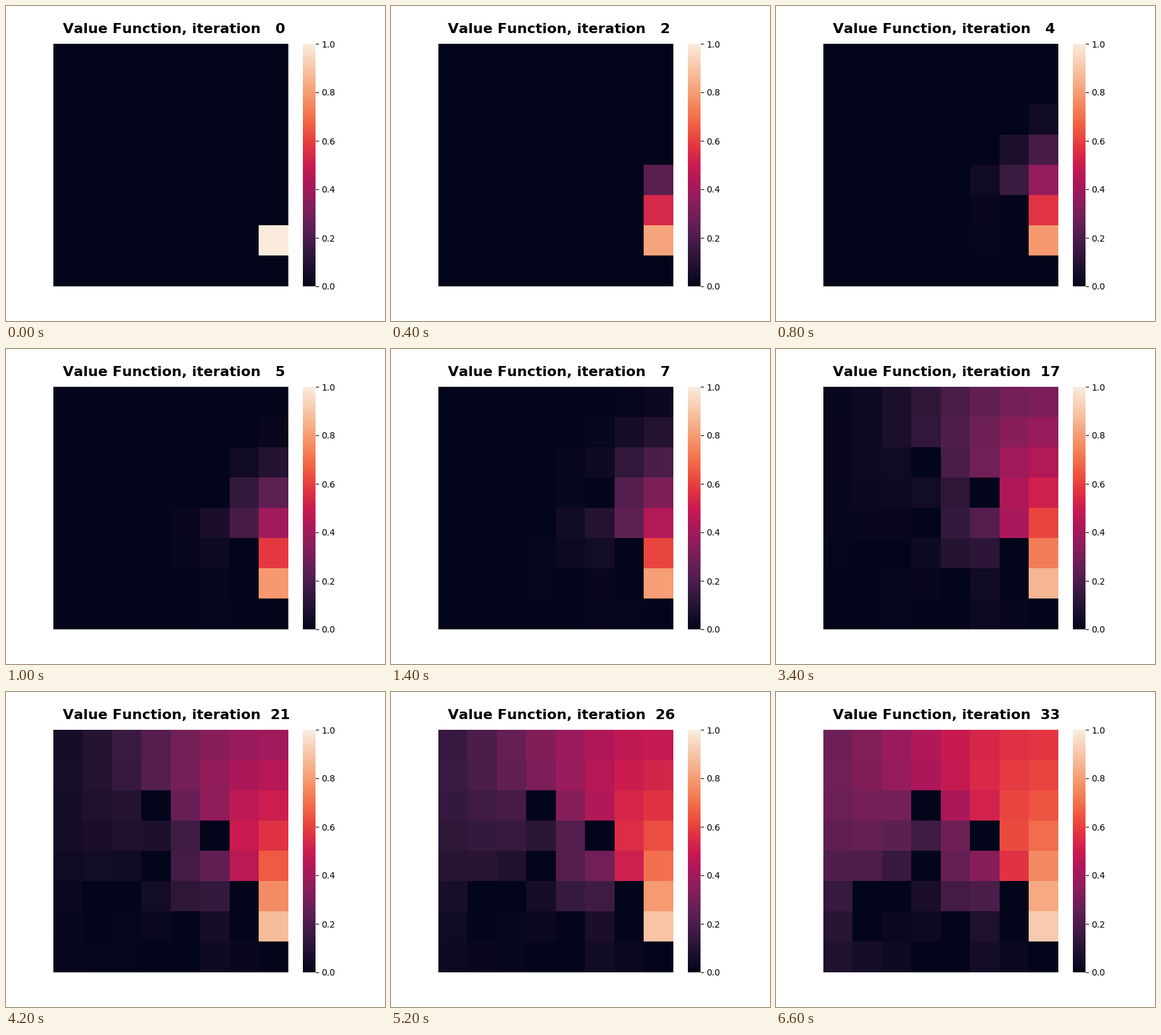
These frames come from a looping animation (600x500 px, 6800 ms). A matplotlib script:

```python
import numpy as np
import matplotlib.pyplot as plt
from matplotlib.animation import FuncAnimation
from matplotlib.colors import LinearSegmentedColormap

ITERATIONS = 34
# S start, F ice, H hole, G goal, X never explored
LAKE = ["SFFFFFFF", "FFFFFFFF", "FFFHFFFF", "FFFFFHFF",
        "FFFHFFFF", "FHHFFFHF", "FHFFHFHF", "FFFHXFFG"]
MOVES = LEFT, DOWN, RIGHT, UP = (0, -1), (1, 0), (0, 1), (-1, 0)

ROCKET = [(0, "#03051a"), (.1429, "#35193e"), (.2, "#4c1d4b"),
          (.25, "#611f53"), (.2857, "#701f57"), (.3333, "#841e5a"),
          (.4, "#a11a5b"), (.4286, "#ad1759"), (.5, "#cb1b4f"),
          (.5714, "#e13342"), (.6, "#e83f3f"), (.6667, "#f06043"),
          (.7143, "#f37651"), (.75, "#f4875e"), (.8, "#f69c73"),
          (.8571, "#f6b48f"), (1, "#faebdd")]


def outcome(values, r, c, move):
    """Value of the cell reached by a move; walls keep you in place."""
    y = min(max(r + move[0], 0), 7)
    x = min(max(c + move[1], 0), 7)
    if LAKE[y][x] == "G":
        # the reward is only known from the cell above the goal
        return float(move == DOWN)
    return values[y, x]


def sweep(values, k):
    """One in-place value iteration sweep on the slippery lake."""
    v = values.copy()
    # the learned model starts optimistic and settles at 1/3
    intended = 1 / 3 + .5 / (k + 2)
    slip = (1 - intended) / 2
    for r, c in np.ndindex(8, 8):
        if LAKE[r][c] in "SF":
            reach = [outcome(v, r, c, move) for move in MOVES]
            v[r, c] = max(intended * reach[a]
                          + slip * (reach[a - 1] + reach[(a + 1) % 4])
                          for a in range(4))
    return v


start = np.zeros((8, 8))
start[6, 7] = 1
history = [start]
for k in range(1, ITERATIONS):
    history.append(sweep(history[-1], k))

plt.rcParams["text.kerning_factor"] = 6
fig, ax = plt.subplots(figsize=(6, 5), dpi=100)
cmap = LinearSegmentedColormap.from_list("heat", ROCKET)

# the axes use stage pixels, so cell edges fall on whole pixels
xs = np.floor(np.linspace(75, 447, 9))
ys = np.floor(np.linspace(60, 445, 9))
mesh = ax.pcolormesh(xs, ys, start, cmap=cmap, vmin=0, vmax=1)
ax.set(xlim=(75, 447), ylim=(445, 60))
ax.axis("off")
bar = fig.colorbar(mesh, ax=ax)
bar.outline.set_linewidth(0)
title = fig.text(.15, .914, "", fontsize=16, fontweight="bold")


def update(k):
    mesh.set_array(history[k])
    title.set_text(f"Value Function, iteration {k:3d}")
    return mesh, title


anim = FuncAnimation(fig, update, frames=ITERATIONS, interval=200,
                     repeat=True, repeat_delay=0)
plt.show()
```
